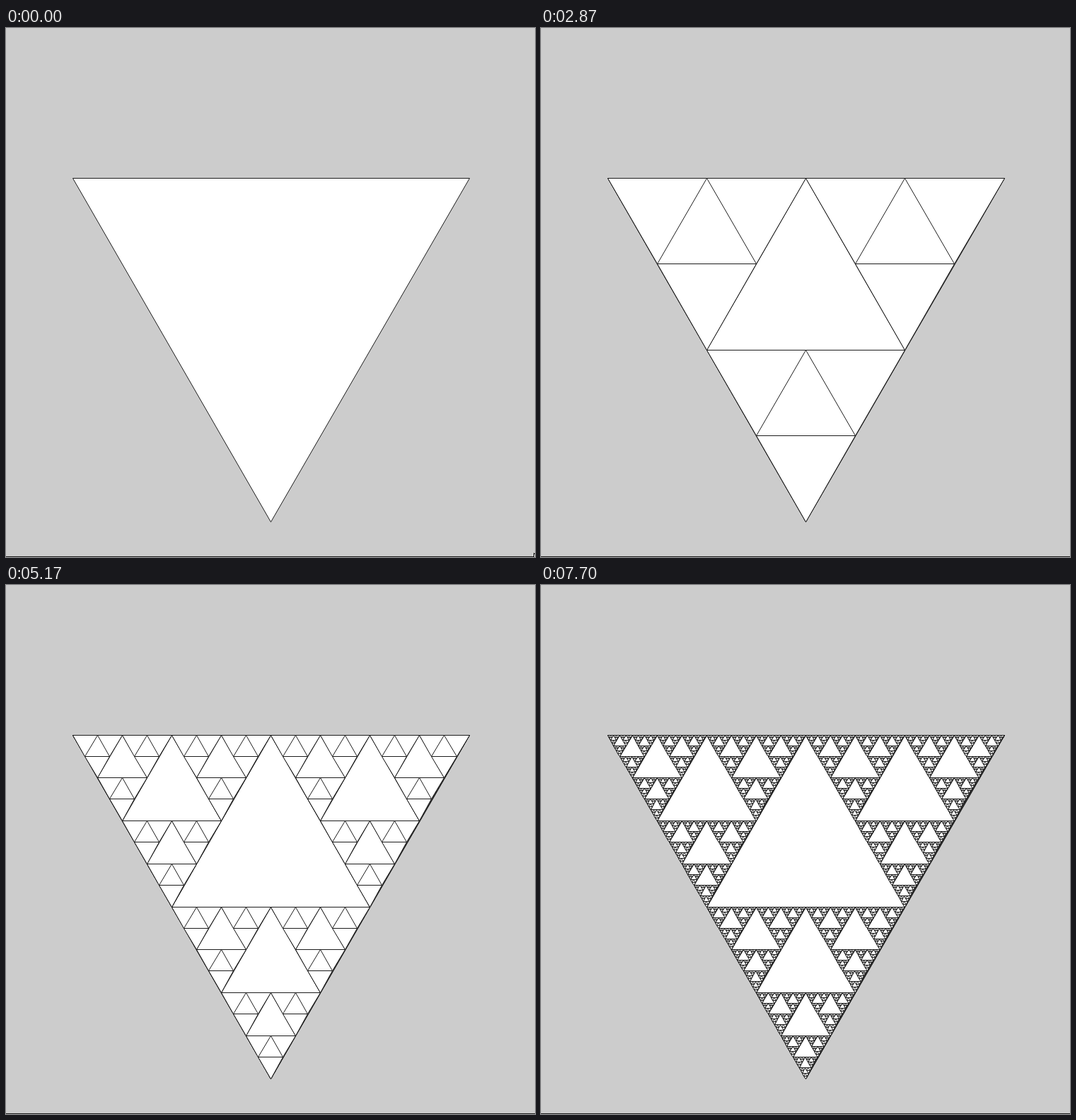
Recreate the animation shown at these times as an HTML page with a canvas. Size 748x748 px, loop 8 s.

```html
<!DOCTYPE html>
<html lang="en">
<head>
<meta charset="utf-8">
<title>Sierpinski triangle</title>
<style>
  html, body { margin: 0; width: 100%; height: 100%; overflow: hidden; background: #ccc; }
  canvas { display: block; }
</style>
</head>
<body>
<canvas id="stage" width="748" height="748"></canvas>
<script>
const SIZE = 748, LOOP = 8000, INK = '#1c1c1c';
const SPLITS = [1400, 2430, 3430, 4470, 5500, 6570, 7630]; // when each depth appears
const ctx = document.getElementById('stage').getContext('2d');

// Pointer waypoints: time, x, y
const POINTER = [
  [0, 746, 742], [1100, 746, 742], [1270, 742, 743],
  [1630, 742, 743], [1800, 749, 749], [LOOP, 749, 749]
];

// Corners are whole pixels, so midpoints are truncated
const mid = (p, q) => p.map((v, i) => Math.floor((v + q[i]) / 2));

function polygon(g, points) {
  g.beginPath();
  for (const [x, y] of points) g.lineTo(x, y);
  g.closePath();
  g.fill();
  g.stroke();
}

function sierpinski(g, a, b, c, depth) {
  polygon(g, [a, b, c]);
  if (!depth) return;
  const ab = mid(a, b), bc = mid(b, c), ca = mid(c, a);
  sierpinski(g, a, ab, ca, depth - 1);
  sierpinski(g, ab, b, bc, depth - 1);
  sierpinski(g, ca, bc, c, depth - 1);
}

function makeScene(depth) {
  const layer = document.createElement('canvas');
  layer.width = layer.height = SIZE;
  const g = layer.getContext('2d');
  g.fillStyle = '#ccc';
  g.fillRect(0, 0, SIZE, SIZE);
  g.fillStyle = INK;
  g.fillRect(0, SIZE - 1, SIZE, 1);
  g.fillStyle = '#fff';
  g.strokeStyle = INK;
  g.translate(0.5, 0.5);
  sierpinski(g, [94, 212], [655, 212], [374, 698], depth);
  return layer;
}

const scenes = [0, ...SPLITS].map((_, depth) => makeScene(depth));

function pointerAt(t) {
  const i = POINTER.findIndex(p => p[0] > t);
  const [t0, x0, y0] = POINTER[i - 1], [t1, x1, y1] = POINTER[i];
  const k = (t - t0) / (t1 - t0);
  return [Math.round(x0 + (x1 - x0) * k), Math.round(y0 + (y1 - y0) * k)];
}

function drawPointer(x, y) {
  if (x >= SIZE || y >= SIZE) return;
  ctx.save();
  ctx.translate(x + 0.5, y + 0.5);
  ctx.fillStyle = '#fff';
  ctx.strokeStyle = '#000';
  polygon(ctx, [[0, 0], [0, 16], [4, 12], [7, 18], [9, 17], [6, 11], [11, 11]]);
  ctx.restore();
}

const start = performance.now();
function frame() {
  const t = (performance.now() - start) % LOOP;
  ctx.drawImage(scenes[SPLITS.filter(s => s <= t).length], 0, 0);
  drawPointer(...pointerAt(t));
  requestAnimationFrame(frame);
}
frame();
</script>
</body>
</html>
```
